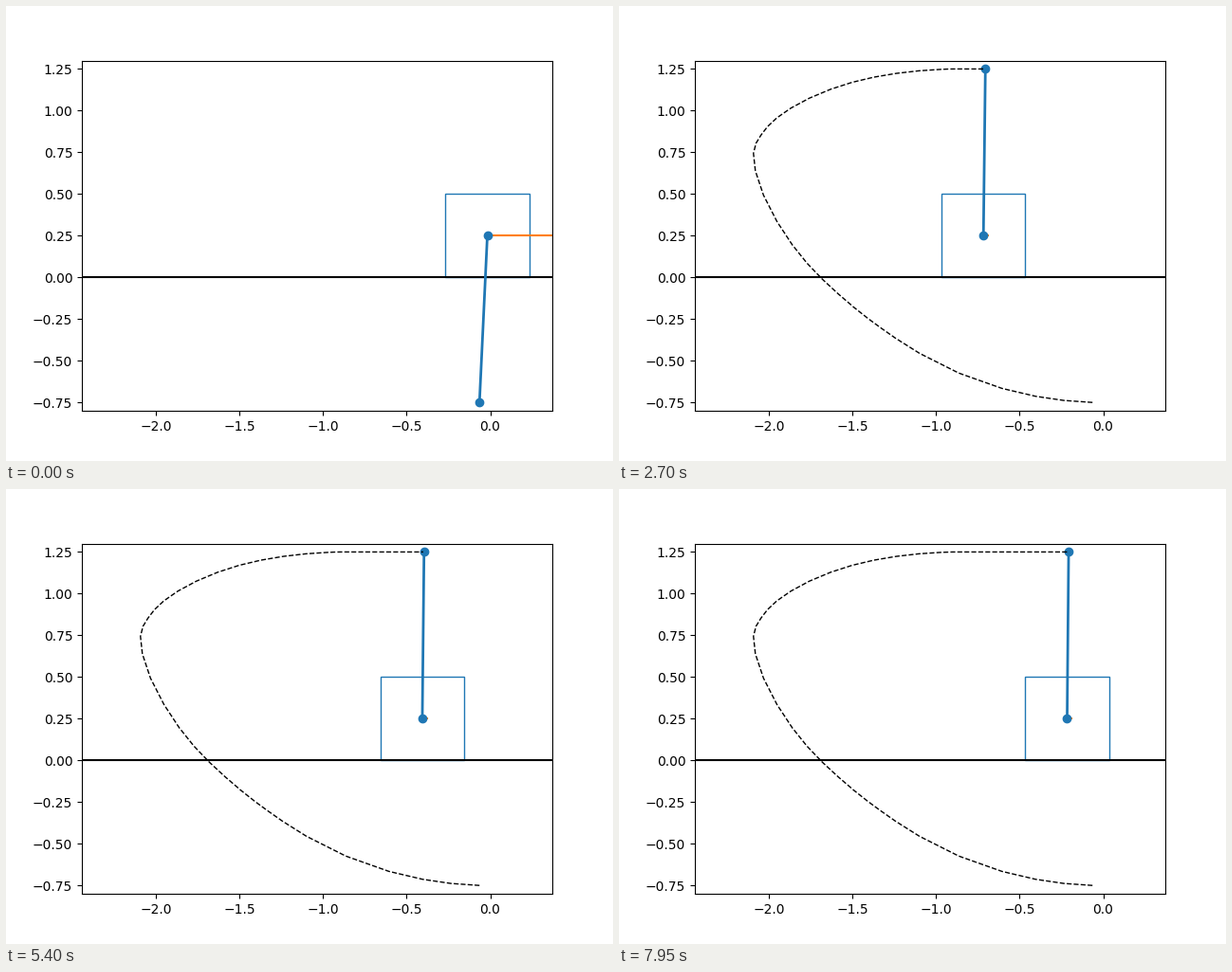
A matplotlib script that plays this animation: 640x480 px, repeating every 8000 ms.

```python
import numpy as np
import matplotlib.pyplot as plt
from matplotlib.animation import FuncAnimation
from matplotlib.patches import Rectangle

FRAMES, INTERVAL = 160, 50
LEFT, RIGHT, TOP, BOTTOM = 80, 576, 57.6, 427.2   # axes edges in pixels
X0, Y0 = 510.5, 286.41                            # pixel of the data origin
SX, SY = 176.3, 176.0                             # pixels per unit
PIVOT, SIDE = 0.25, 0.5

# Key poses of the swing-up: step, cart column, pole angle from hanging
KEYS = np.array([
    (0, 507.5, 0.047), (3, 475, 0.416), (5, 442, 0.789), (9, 407, 1.127),
    (13, 358.7, 1.517), (17, 295, 2.088), (19, 290.3, 2.217),
    (21, 291.1, 2.355), (25, 315, 2.739), (29, 352, 3.076),
])
SETTLE = KEYS[-1, 0]    # from here the pole is balanced


def smooth(t, tk, vk):
    """Cubic Hermite curve through the keys."""
    slope = np.gradient(vk, tk)
    j = np.clip(np.searchsorted(tk, t, side="right") - 1, 0, len(tk) - 2)
    h = tk[j + 1] - tk[j]
    s = np.clip((t - tk[j]) / h, 0, 1)
    r = 1 - s
    return (r * r * (1 + 2 * s) * vk[j] + s * s * (3 - 2 * s) * vk[j + 1]
            + h * s * r * (r * slope[j] - s * slope[j + 1]))


def motion():
    n = np.arange(FRAMES)
    step, col, ang = KEYS.T
    # Balanced phase: the cart creeps home, the pole leans slightly ahead
    home = X0 - 200.6 * np.exp(-0.0076 * n - 1.8e-5 * n ** 2)
    lean = np.pi + 0.013 - 2.5e-5 * n - 0.078 * np.exp(-(n - SETTLE) / 2)
    swing = n < SETTLE
    cart = (np.where(swing, smooth(n, step, col), home) - X0) / SX
    angle = np.where(swing, smooth(n, step, ang), lean)
    # Pump while swinging, push to catch the pole, then hold gently
    pump = 800 * np.cos(angle) * np.clip((20 - n) / 4, 0, 1)
    catch = 320 * np.exp(-((n - 25.5) / 2) ** 2)
    hold = 4.8 * (n >= SETTLE)
    return cart, angle, (pump + catch + hold) / SX


cart, angle, force = motion()
tip_x = cart - np.sin(angle)
tip_y = PIVOT - np.cos(angle)

fig, ax = plt.subplots(figsize=(6.4, 4.8), dpi=100)
ax.set_xlim((LEFT - X0) / SX, (RIGHT - X0) / SX)
ax.set_ylim((Y0 - BOTTOM) / SY, (Y0 - TOP) / SY)
ax.set_xticks(np.arange(-2, 0.1, 0.5))
ax.axhline(0, color="black")
box = ax.add_patch(Rectangle((0, 0), SIDE, SIDE, fill=False, ec="C0", lw=1))
push, = ax.plot([], [], color="C1", lw=1.5)
pole, = ax.plot([], [], "o-", color="C0", lw=2)
trail, = ax.plot([], [], "k--", lw=1)


def draw(i):
    x = cart[i]
    box.set_x(x - SIDE / 2)
    push.set_data([x, x + force[i]], [PIVOT, PIVOT])
    pole.set_data([x, tip_x[i]], [PIVOT, tip_y[i]])
    trail.set_data(tip_x[:i], tip_y[:i])
    return box, push, pole, trail


anim = FuncAnimation(fig, draw, frames=FRAMES, interval=INTERVAL,
                     repeat=True, repeat_delay=0)
plt.show()
```
